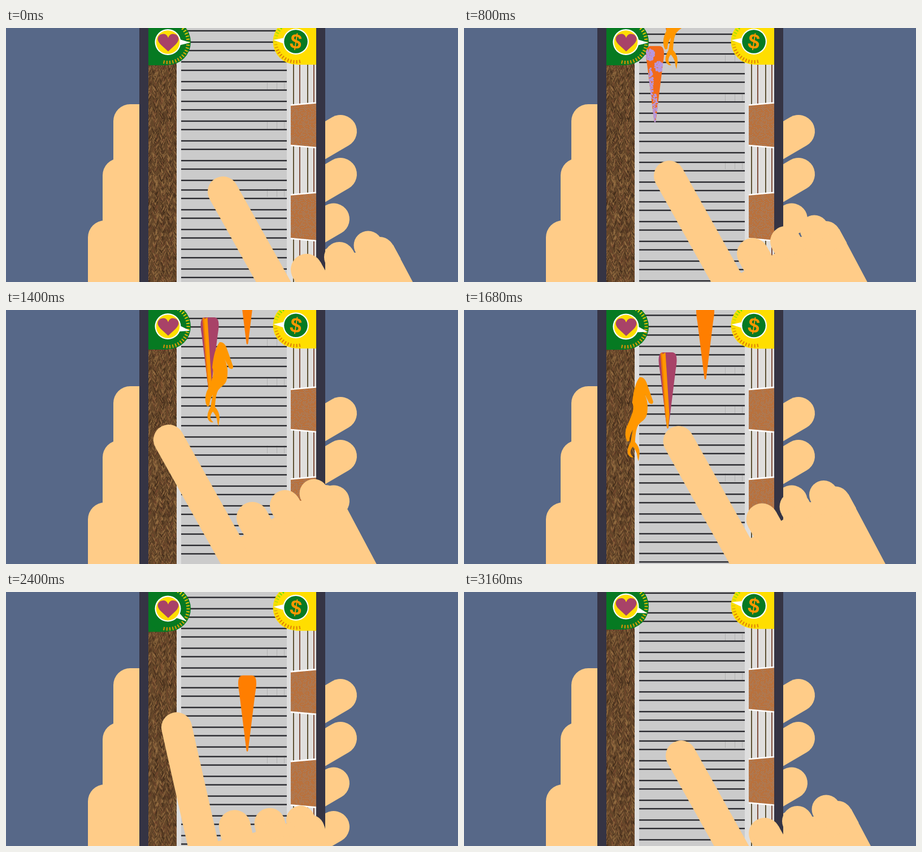
An HTML page with a canvas that plays this animation: 800x450 px, repeating every 3200 ms.

```html
<!DOCTYPE html>
<html>
<head>
<meta charset="utf-8">
<title>Carrot sorting</title>
<style>
html, body { margin: 0; width: 100%; height: 100%; overflow: hidden; background: #576888; }
canvas { display: block; width: 800px; height: 450px; }
</style>
</head>
<body>
<canvas id="stage" width="800" height="450"></canvas>
<script>
const g = document.getElementById('stage').getContext('2d');
const TAU = Math.PI * 2, RAD = Math.PI / 180, LOOP = 3200, STEP = 40;
const SKIN = '#ffcc88', GREEN = '#067a22', YELLOW = '#ffde00', MAROON = '#a84268';
const FALL = 0.2217;

let seed = 7;
const rnd = () => (seed = seed * 16807 % 2147483647) / 2147483647;

// Keys are [time, value...]
const HAND = [
  [0, 384, 290, 0], [560, 384, 290, 0], [800, 363, 262, 0], [1080, 355, 248, 0],
  [1320, 272, 226, 0], [1400, 288, 230, 0], [1560, 428, 231, 0], [1600, 424, 231, 0],
  [1840, 276, 240, 0], [2040, 328, 252, 0], [2120, 364, 252, 0], [2280, 280, 242, 6],
  [2400, 302, 240, 16.5], [2560, 405, 224, 27], [2720, 477, 211, 33], [2800, 460, 222, 29],
  [3040, 384, 290, 0], [3200, 384, 290, 0]
];
const BOB = [[0, 0], [900, 0], [1400, 4], [2040, 4.6], [2400, 4.6], [2720, 4], [3160, 0.5], [3200, 0]];
const HEART = [[0, 1], [1200, 2], [1400, 11], [1640, 12], [1800, 20], [2200, 20],
  [2400, 34], [2600, 34], [2720, 18], [3200, 18]];
const MONEY = [[0, 4], [2400, 2], [2560, 2], [2720, 11], [3200, 9]];

// Monotone cubic interpolation: rests at extremes, flows through other keys
function at(keys, t, c = 1) {
  let i = 0;
  while (i < keys.length - 2 && t >= keys[i + 1][0]) i++;
  const rate = k => keys[k] && keys[k + 1]
    ? (keys[k + 1][c] - keys[k][c]) / (keys[k + 1][0] - keys[k][0]) : 0;
  const slope = k => {
    const a = rate(k - 1), b = rate(k);
    return a * b > 0 ? 2 * a * b / (a + b) : 0;
  };
  const h = keys[i + 1][0] - keys[i][0], u = (t - keys[i][0]) / h, s = u * u * (3 - 2 * u);
  return keys[i][c] + (keys[i + 1][c] - keys[i][c]) * s
    + h * u * (1 - u) * ((1 - u) * slope(i) - u * slope(i + 1));
}

function rect(x, y, w, h, fill) { g.fillStyle = fill; g.fillRect(x, y, w, h); }
function disc(x, y, r, fill) {
  g.fillStyle = fill;
  g.beginPath();
  g.arc(x, y, r, 0, TAU);
  g.fill();
}
function poly(points, fill) {
  g.fillStyle = fill;
  g.beginPath();
  points.forEach(p => g.lineTo(...p));
  g.fill();
}
function line(x1, y1, x2, y2, width, color, cap = 'butt') {
  g.lineWidth = width;
  g.strokeStyle = color;
  g.lineCap = cap;
  g.beginPath();
  g.moveTo(x1, y1);
  g.lineTo(x2, y2);
  g.stroke();
}
function texture(w, h, base, paint) {
  const c = document.createElement('canvas');
  c.width = w;
  c.height = h;
  const p = c.getContext('2d');
  p.fillStyle = base;
  p.fillRect(0, 0, w, h);
  paint(p);
  return c;
}

const weave = texture(50, 400, '#644629', p => {
  const tones = ['#3d2918', '#4b3220', '#8d683d', '#9a7245', '#77492f'];
  for (let i = 0; i < 2600; i++) {
    const x = rnd() * 50, y = rnd() * 400, side = Math.floor(x / 6.25) % 2 ? 1 : -1;
    p.strokeStyle = tones[Math.floor(rnd() * 5)];
    p.beginPath();
    p.moveTo(x, y);
    p.lineTo(x + side * 2.5, y + 6);
    p.stroke();
  }
});
const wood = texture(45, 90, '#b5713f', p => {
  for (let y = 0; y < 90; y += 2)
    for (let x = 0; x < 45; x += 3) {
      p.fillStyle = rnd() < 0.5 ? '#a08a7a' : '#c2733a';
      p.fillRect(x + y / 2 % 2, y, 1.5, 1);
    }
});

const CONE = new Path2D('M-16 14Q-16 0 -8 0H8Q16 0 16 14Q16 20 14 32L1.5 133Q0 137 -1.5 133L-14 32Q-16 20 -16 14Z');
const KNOT = new Path2D('M3 -148Q11 -149 15 -139L27 -105Q27 -98 20 -102L12 -118Q18 -105 17 -92Q17 -77 9 -71Q-1 -65 -3 -53Q-5 -41 -5 -33Q3 -25 3 -13L1 1Q-1 -5 -2 -13Q-5 -21 -9 -25Q-14 -19 -13 -13Q-11 -8 -8 -6Q-15 -5 -18 -13Q-20 -21 -13 -33Q-11 -45 -9 -55Q-15 -45 -15 -35L-19 -34Q-25 -45 -20 -60Q-15 -70 -9 -87Q-7 -97 -10 -103Q-7 -135 3 -148Z');
const HEART_SHAPE = new Path2D('M0 16L-13 4Q-20 -3 -18 -9Q-15 -16 -7 -15Q-2 -14 0 -8Q2 -14 7 -15Q15 -16 18 -9Q20 -3 13 4Z');

// Speckles: centre x, centre y, spread x, spread y
const specks = [[-9, 15, 7, 9], [7, 36, 7, 8], [-8, 66, 4, 24], [0, 113, 5, 24]].flatMap(
  ([x, y, w, h]) => Array.from({ length: 110 }, () => {
    const a = rnd() * TAU, r = Math.sqrt(rnd()) * 1.15;
    return [x + Math.cos(a) * r * w, y + Math.sin(a) * r * h];
  }));

const carrots = [
  { x: 338, t: 800, y: 32, hit: 1120, dir: -1, draw() {
    g.fillStyle = '#f26a18';
    g.fill(CONE);
    g.clip(CONE);
    specks.forEach(([x, y]) => rect(x - 1, y - 1, 2.4, 2.4, '#b698e0'));
  } },
  { x: 360.5, t: 1400, y: 13, hit: 2140, dir: -1, draw() {
    g.fillStyle = MAROON;
    g.fill(CONE);
    g.clip(CONE);
    poly([[-13, 0], [-9, 0], [0, 137], [-3, 137]], '#f07800');
    poly([[-10, 4], [-4, 0], [3, 110], [1, 137], [-1, 137]], '#ff9800');
  } },
  { x: 375, t: 1400, y: 205, hit: 1600, dir: -1, draw() {
    g.fillStyle = '#ff9700';
    g.fill(KNOT);
  } },
  { x: 427, t: 2040, y: 68, hit: 2520, dir: 1, draw() {
    g.fillStyle = '#ff7e00';
    g.fill(CONE);
  } }
];

function drawCarrot(c, t) {
  const dt = Math.max(0, t - c.hit);
  g.save();
  g.translate(c.x + c.dir * (0.6 * dt + 0.003 * dt * dt), c.y + (t - c.t) * FALL);
  c.draw();
  g.restore();
}

function gauge(x, y, side, angle, back, face, drawIcon) {
  g.save();
  g.translate(x, y);
  g.save();
  g.scale(side, 1);
  rect(-37, -30, 37, 71, back);
  disc(0, 0, 40.5, back);
  for (let i = 0; i < 20; i++) {
    const a = (101 - i * 8.4) * RAD, c = Math.cos(a), s = Math.sin(a);
    const hue = side > 0 ? 38 + i : 34 + Math.max(0, i - 9) * 7;
    line(c * 33, s * 33, c * 39, s * 39, 2, `hsl(${hue} 95% 45%)`);
  }
  g.rotate(angle * RAD);
  poly([[18, -6], [40, 0], [18, 6]], '#fff');
  g.restore();
  disc(0, 0, 23, '#fff');
  disc(0, 0, 20.8, face);
  drawIcon();
  g.restore();
}

function belt(frame, bob) {
  rect(302, 0, 202, 450, '#dedede');
  rect(310, 0, 187, 450, '#cbcbcb');
  const seam = [287, 263.5, 238][frame % 3] + bob;
  const bar = y => rect(310, y - 1.2, 187, 2.4, '#28282d');
  for (let y = seam, i = 0; y < 455; y += i++ % 2 ? 20 : 15) bar(y);
  for (let y = seam - 17, i = 0; y > -5; y -= i++ % 2 ? 15 : 20) bar(y);
  for (const d of [-190, -122, -2])
    for (const x of [462, 479, 492]) rect(x, seam + d, 1, 14, 'rgba(60,60,60,.16)');
}

function crates(bob) {
  g.save();
  g.translate(504, bob);
  rect(0, -10, 45, 470, '#e0dfdd');
  [4, 15, 29, 40].forEach((x, i) => rect(x, 0, 1.8, 460, i % 2 ? '#78402c' : '#514423'));
  for (const y of [135, 294]) {
    const low = y + (y < 200 ? 75 : 81);
    g.save();
    g.beginPath();
    g.moveTo(0, y + 2);
    g.lineTo(45, y - 2);
    g.lineTo(45, low + 2);
    g.lineTo(0, low - 2);
    g.clip();
    g.drawImage(wood, 0, y - 3);
    g.restore();
    line(0, y + 1.5, 45, y - 2.5, 2.6, '#fff');
    line(0, low - 2, 45, low + 2, 2.6, '#fff');
  }
  g.restore();
}

function holdingHand() {
  for (const [x, y] of [[190, 135], [171, 231], [145, 341]]) {
    g.fillStyle = SKIN;
    g.beginPath();
    g.roundRect(x, y, 110, 500, 30);
    g.fill();
  }
  for (const [x, y, w] of [[592, 183, 58], [592, 259, 58], [580, 338.5, 56], [580, 416, 56]])
    line(x, y, x - 70, y + 41, w, SKIN, 'round');
}

function swipingHand(t) {
  g.save();
  g.translate(at(HAND, t, 1), at(HAND, t, 2));
  g.rotate(at(HAND, t, 3) * RAD);
  line(0, 0, 293, 524, 54, SKIN, 'round');
  poly([[126, 173], [182, 141], [232, 108], [277, 107], [301, 94], [513, 494], [277, 494]], SKIN);
  disc(105, 255, 35, SKIN);
  for (const [x, y, r] of [[148, 138, 28], [206, 116, 27], [257, 95, 25.5], [277, 107, 27]]) {
    disc(x, y, r, SKIN);
    line(x, y, x + 14, y + 25, r * 2, SKIN);
  }
  g.restore();
}

function render(t) {
  const bob = at(BOB, t);
  rect(0, 0, 800, 450, '#576888');
  holdingHand();
  rect(236, 0, 329, 450, '#353444');

  g.save();
  g.beginPath();
  g.rect(252, 0, 297, 450);
  g.clip();
  belt(t / STEP, bob);
  g.drawImage(weave, 252, 60 + bob);
  crates(bob);
  gauge(286.5, 25 + bob, 1, at(HEART, t), GREEN, YELLOW, () => {
    g.translate(0.5, 0.5);
    g.fillStyle = MAROON;
    g.fill(HEART_SHAPE);
  });
  gauge(513, 24 + bob * 0.8, -1, -at(MONEY, t), YELLOW, GREEN, () => {
    g.rotate(9 * RAD);
    g.fillStyle = '#ff9700';
    g.font = 'bold 37px "Liberation Sans", sans-serif';
    g.textAlign = 'center';
    g.textBaseline = 'alphabetic';
    g.fillText('$', 0, 12.5);
  });
  carrots.forEach(c => drawCarrot(c, t));
  g.restore();

  swipingHand(t);
}

function tick() {
  render(Math.floor(performance.now() % LOOP / STEP) * STEP);
  requestAnimationFrame(tick);
}
tick();
</script>
</body>
</html>
```
